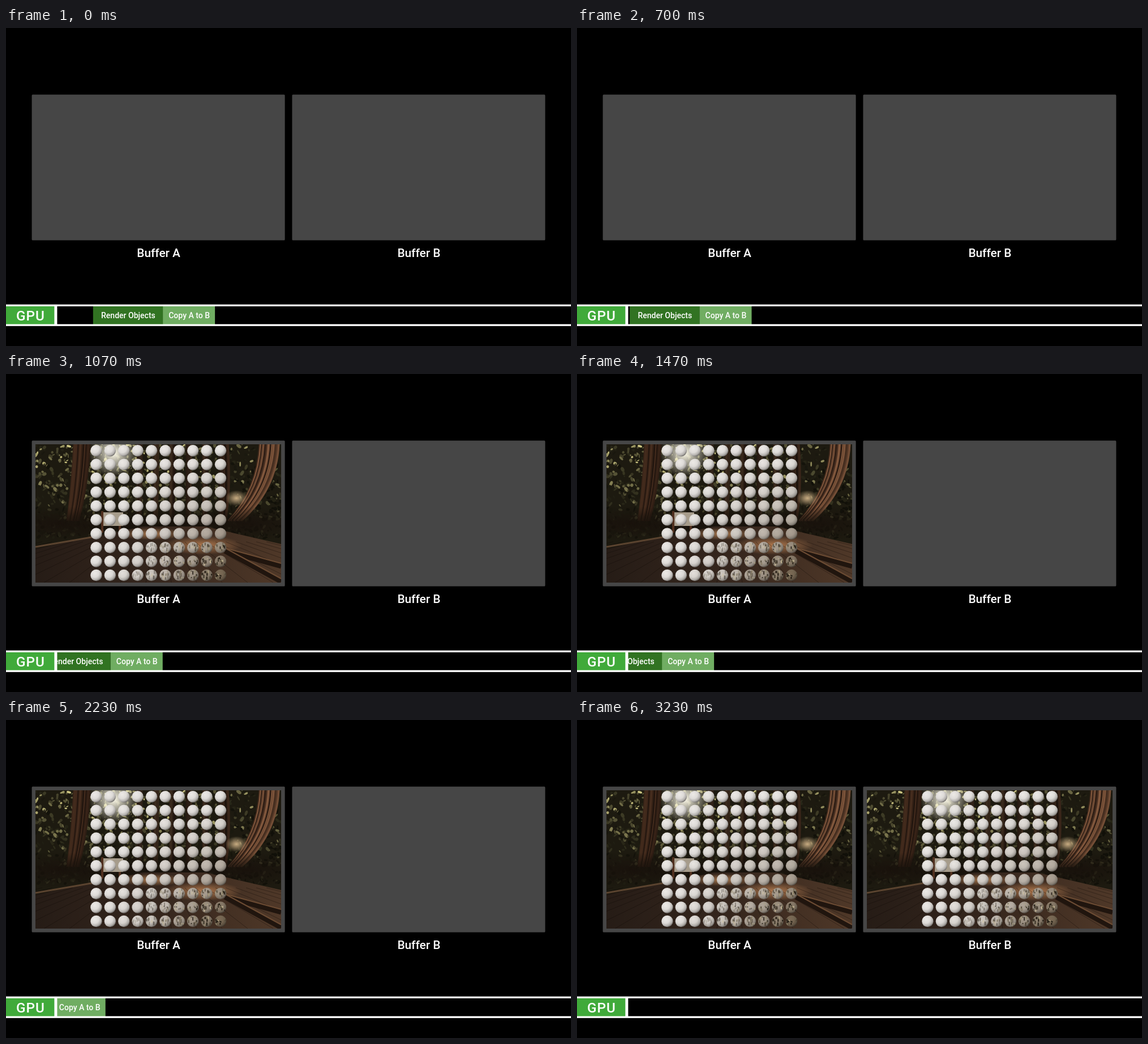
Animation, 998 px wide and 561 px high, one loop 4.03 s. Source, as an HTML page with a canvas:

```html
<!DOCTYPE html>
<html lang="en">
<head>
<meta charset="utf-8">
<title>Render, then copy between buffers</title>
<style>
  html, body { margin: 0; width: 100%; height: 100%; overflow: hidden; background: #000; }
  canvas { display: block; }
</style>
</head>
<body>
<canvas id="stage" width="998" height="561"></canvas>
<script>
const LOOP = 4030;
const TICKS = 97, TRAVEL = 280;      // the timeline moves TRAVEL px in TICKS steps
const RENDERED = 28, COPIED = 71;    // ticks at which the buffers fill
const W = 434, H = 244;              // picture size
const ctx = document.getElementById('stage').getContext('2d');

let seed = 11;
const random = () => (seed = seed * 16807 % 2147483647) / 2147483647;
const between = (a, b) => a + (b - a) * random();
const mix = (a, b, k) => `rgb(${a.map((v, i) => Math.round(v + (b[i] - v) * k))})`;

function box(c, color, x, y, w, h) {
  c.fillStyle = color;
  c.fillRect(x, y, w, h);
}

function line(c, color, width, path) {
  c.strokeStyle = color;
  c.lineWidth = width;
  c.stroke(new Path2D(path));
}

function glow(c, rgb, x, y, rx, ry) {
  c.save();
  c.translate(x, y);
  c.scale(rx, ry);
  const g = c.createRadialGradient(0, 0, 0, 0, 0, 1);
  g.addColorStop(0, `rgb(${rgb})`);
  g.addColorStop(1, `rgba(${rgb},0)`);
  box(c, g, -1, -1, 2, 2);
  c.restore();
}

// Foliage is brightest around the sun and fades towards the ground.
function leaves(c, count) {
  for (let i = 0; i < count; i++) {
    const x = between(0, W), y = between(0, 165);
    const sun = Math.max(0, 1 - Math.hypot(x - 138, y - 18) / 260);
    const light = (random() ** 4 + sun * random() * 0.7) * (1 - y / 190);
    c.fillStyle = mix([17, 16, 9], [205, 198, 130], Math.min(1, light));
    c.beginPath();
    c.ellipse(x, y, between(1, 5), between(1, 3), between(0, 3), 0, 7);
    c.fill();
  }
}

// A trunk is a bundle of bark strands.
function trunk(c, top, bend, foot, width, light) {
  for (let i = 0; i < width; i += 2)
    line(c, mix([30, 19, 13], light, random()), 3,
      `M${top + i} 0Q${bend + i} 80 ${foot + i * 0.7} 135`);
}

function deck(c) {
  const g = c.createLinearGradient(0, 0, W, 0);
  g.addColorStop(0, '#261c16');
  g.addColorStop(0.5, '#35261d');
  g.addColorStop(1, '#4f3828');
  c.fillStyle = g;
  c.fill(new Path2D('M0 184L190 145H300L434 176V244H0Z'));
  glow(c, [165, 118, 78], 205, 158, 60, 11);
  glow(c, [175, 120, 78], 295, 178, 70, 17);
  for (let x = -300; x < W + 300; x += 45)
    line(c, 'rgba(15,10,7,.35)', 1, `M${220 + (x - 220) * 0.4} 172L${x} 244`);
  line(c, '#5a432f', 3, 'M0 181L110 162');
  for (const end of [215, 242]) {
    line(c, '#20150e', 9, `M335 188L434 ${end}`);
    line(c, '#6b4b33', 2, `M335 183L434 ${end - 5}`);
  }
}

function forest(c) {
  box(c, '#1d1a10', 0, 0, W, H);
  c.filter = 'blur(0.7px)';
  leaves(c, 1500);
  glow(c, [255, 252, 235], 138, 16, 44, 42);
  for (let x = 180; x < 330; x += 29) trunk(c, x, x, x, 9, [62, 46, 32]);
  trunk(c, 326, 332, 326, 16, [58, 38, 26]);
  trunk(c, 68, 64, 56, 30, [78, 50, 33]);
  trunk(c, 396, 392, 340, 36, [145, 98, 68]);
  glow(c, [200, 172, 130], 355, 95, 20, 14);
  for (let x = 40; x < W; x += 110) glow(c, [25, 18, 12], x, 140, 110, 30);
  deck(c);
  c.filter = 'none';
  line(c, '#51301f', 4, 'M118 118V156M149 140V156');
  box(c, '#a69c8b', 120, 120, 35, 24);
}

// Spheres turn from matte white to mirror towards the lower right.
function sphere(c, col, row) {
  const x = 107.4 + col * 24.4, y = 11.2 + row * 24.42, r = 10.2;
  const metal = (col / 9) ** 1.7 * (row / 9) ** 1.4;
  const g = c.createRadialGradient(x - 3, y - 4, 0, x - 3, y - 4, r + 5);
  const stop = (at, white) =>
    g.addColorStop(at, mix([white, white - 3, white - 6], [white * 0.52, white * 0.45, white * 0.36], metal));
  stop(0, 236);
  stop(0.5, 222);
  stop(0.8, 180);
  stop(1, 105);
  c.fillStyle = g;
  c.beginPath();
  c.arc(x, y, r, 0, 7);
  c.fill();
  if (metal < 0.15 || row < 7) return;
  c.save();
  c.clip();
  c.globalAlpha = Math.min(1, metal + 0.1);
  for (let i = 0; i < 14; i++)
    box(c, mix([25, 19, 12], [220, 205, 165], random() ** 2), x + between(-10, 8), y + between(-9, 4), 2, between(2, 7));
  c.restore();
}

function makePicture() {
  const canvas = document.createElement('canvas');
  canvas.width = W;
  canvas.height = H;
  const c = canvas.getContext('2d');
  forest(c);
  for (let row = 0; row < 10; row++)
    for (let col = 0; col < 10; col++) sphere(c, col, row);
  return canvas;
}
const picture = makePicture();

function text(s, x, y, size, spacing = 0) {
  ctx.font = `500 ${size}px Roboto, "Open Sans", sans-serif`;
  ctx.letterSpacing = spacing + 'px';
  ctx.fillStyle = '#fff';
  ctx.textAlign = 'center';
  ctx.fillText(s, x, y);
}

function buffer(x, name, filled) {
  ctx.fillStyle = '#464646';
  ctx.beginPath();
  ctx.roundRect(x, 117.4, 447, 257, 1.5);
  ctx.fill();
  if (filled) ctx.drawImage(picture, Math.round(x + 6.4), 124);
  text(name, x + 224, 404, 20.8);
}

function task(x, w, color, name) {
  box(ctx, color, x, 491, w, 32);
  text(name, x + w / 2 + 0.5, 512, 14);
}

function draw(t) {
  // 30 ticks per second, each starting on a whole 10 ms
  const tick = Math.min(TICKS, Math.floor((Math.floor(t / 10) * 10 + 4) * 0.03));
  const x = 153.8 - tick / TICKS * TRAVEL;

  box(ctx, '#000', 0, 0, 998, 561);
  buffer(45.6, 'Buffer A', tick >= RENDERED);
  buffer(505.4, 'Buffer B', tick >= COPIED);

  task(x, 123.3, '#317322', 'Render Objects');
  task(x + 123.3, 92, '#70ad62', 'Copy A to B');

  box(ctx, '#40aa3a', 0, 491, 86, 32);
  for (const y of [487.7, 522.5]) box(ctx, '#fff', 0, y, 998, 3.3);
  box(ctx, '#fff', 85.4, 488, 5, 37);
  text('GPU', 43.5, 516, 24.3, 1);
}

const start = performance.now();
function loop() {
  draw((performance.now() - start) % LOOP);
  requestAnimationFrame(loop);
}
loop();
</script>
</body>
</html>
```
